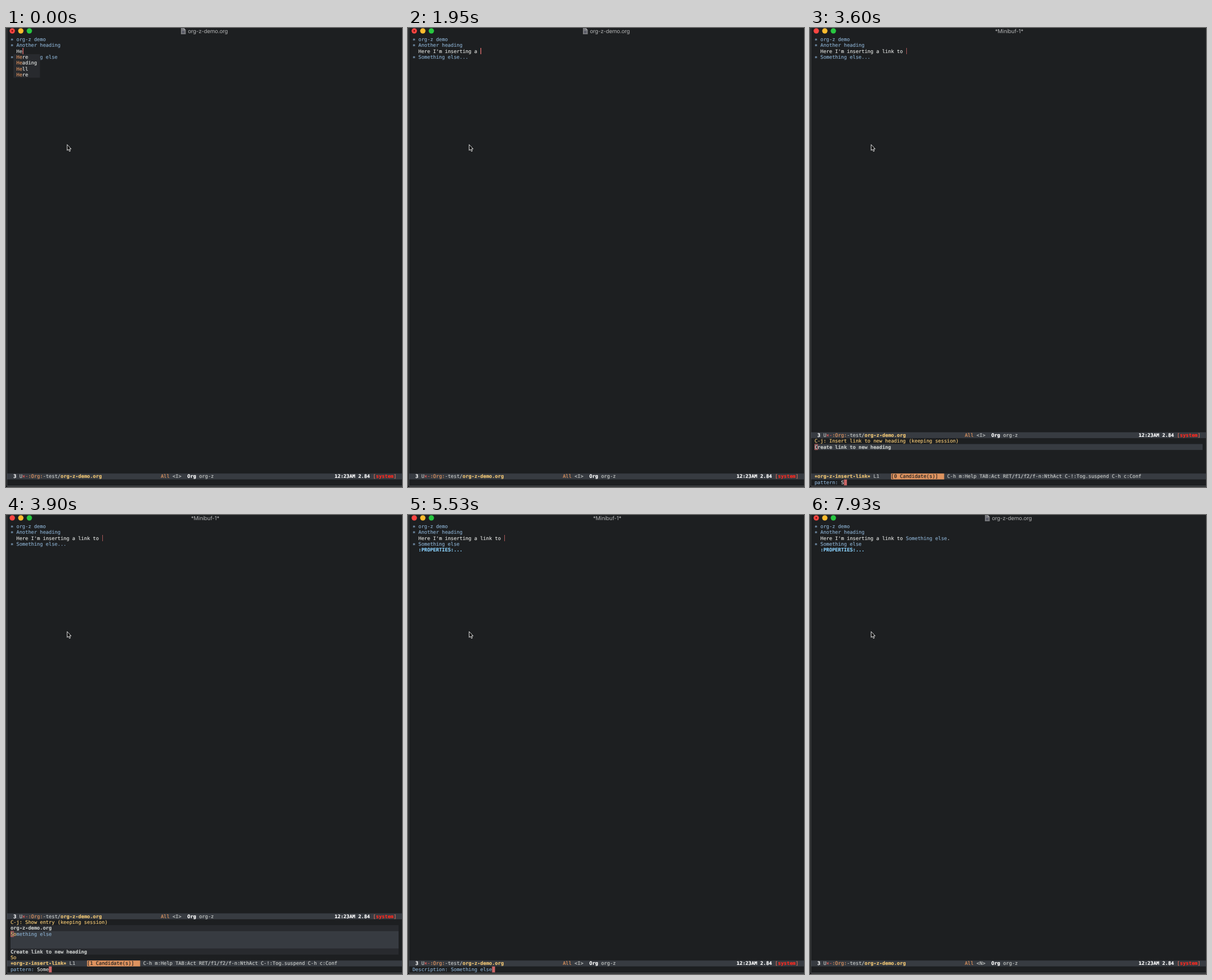
Animation, 695 px wide and 806 px high, one loop 8000 ms. Source, as an HTML page:

```html
<!DOCTYPE html>
<html lang="en">
<head>
<meta charset="utf-8">
<title>Inserting a link</title>
<style>
  html, body { margin: 0; width: 100%; height: 100%; overflow: hidden; background: #1d1f21; }
  svg { display: block; width: 695px; height: 806px; }
  text { font: 8.59px "DejaVu Sans Mono", monospace; white-space: pre; text-rendering: geometricPrecision; stroke-width: .18px; }
  .b { font-weight: bold; }
  .title { font: 9.6px Inter, sans-serif; letter-spacing: -0.2px; }
</style>
</head>
<body>
<svg id="stage" viewBox="0 0 695 806"></svg>
<script>
const LOOP = 8000, CHAR = 5.172, ROW = 10.35, LEFT = 7.9;
const BODY = 14.9, MODE = 782.3, MINI = 792.8;
const BG = '#1d1f21', BAR = '#373b41', SHADE = '#282a2e', FG = '#c5c8c6', LIGHT = '#dcdedc',
      BLUE = '#86a9c8', RED = '#cc6666', ORANGE = '#de935f', YELLOW = '#f0c674';

const IN = ['insert', 'inserting', 'insertion', 'inside-a-heading'];
const LI = ['link', 'links', 'link-type', 'list', 'line', 'lists', 'like', 'listing', 'limit', 'lisp'];

// [time, typed characters, popup prefix length, popup candidates]
const LINE = "Here I'm inserting a link to ";
const TYPING = [
  [0, 2, 2, ['Here', 'Heading', 'Hell', 'Here']], [150, 3, 3, ['Here', 'Here']],
  [300, 5], [450, 6], [600, 8], [750, 9], [900, 11, 2, IN], [1050, 12, 3, IN],
  [1200, 13, 4, IN.slice(0, 3)], [1500, 15, 6, IN.slice(0, 3)],
  [1650, 17, 8, ['inserting']], [1800, 19], [1950, 21], [2100, 22],
  [2250, 23, 2, LI], [2400, 24, 3, LI.slice(0, 3)], [2550, 25, 4, LI.slice(0, 3)],
  [2700, 27], [2850, 29]
];
// [time, typed pattern length, matched pattern length]
// typed -1 hides the prompt, matched -1 means no candidates
const PATTERN = 'Something el';
const SEARCH = [
  [3150, 0, 0], [3600, 1, -1], [3750, 3, 2], [3900, 4, 2], [4050, 5, 4],
  [4200, 7, 5], [4350, 8, 7], [4500, 10, 8], [4640, 12, 10], [4940, -1, 12]
];

const at = (steps, t) => steps.filter(s => s[0] <= t).pop();
const colX = col => LEFT + col * CHAR;
// the asterisk operator sits at mid-height, like the terminal star
const esc = s => s.replace(/&/g, '&amp;').replace(/</g, '&lt;').replace(/\*/g, '∗');
const rect = (x, y, w, h, fill) =>
  `<rect x="${x}" y="${y}" width="${w}" height="${h}" fill="${fill}"/>`;
const put = (col, top, s, fill, bold) =>
  `<text x="${colX(col)}" y="${top + 8.1}" fill="${fill}" stroke="${fill}"${bold ? ' class="b"' : ''}>${esc(s)}</text>`;
const bar = (col, width = 1.5) => rect(Math.ceil(colX(col)), 35, width, 11, RED);
const block = (col, top) => rect(colX(col), top, CHAR, ROW, RED);
const row = n => BODY + n * ROW;

function chrome(mini) {
  const lights = ['#fc4642', '#fdbc2e', '#28c840'].map((c, i) =>
    `<circle cx="${11 + i * 15}" cy="5.1" r="4.7" fill="${c}"/>`).join('');
  const title = mini
    ? '<text class="title" x="349.5" y="9" text-anchor="middle" fill="#b2b3b4">*Minibuf-1*</text>'
    : '<circle cx="11" cy="5.1" r="1.5" fill="#7a0a08"/>' +
      '<path d="M307 0h5l3.500 3.500v7.500h-8.500z" fill="#77787c"/><path d="M312 0v3.500h3.500z" fill="#a5a6aa"/>' +
      rect(309, 5, 4, 4, '#595a66') +
      '<text class="title" x="319.300" y="9" fill="#b2b3b4">org-z-demo.org</text>';
  return rect(0, 0, 695, 806, BG) + rect(0, 0, 1, 806, '#151617') + rect(1, 0, 1, 804, '#4b4d4f') +
    rect(2, 804, 693, 1, '#626467') + rect(0, 805, 695, 1, '#151617') + lights + title;
}

function modeLine(top, state) {
  return rect(2, top, 693, ROW, BAR) +
    put(1, top, '3', '#fff', 1) + put(3, top, 'U', FG) + put(4, top, '×-', '#e0605c') +
    put(6, top, ':Org:', ORANGE) + put(11, top, '-test/', FG) +
    put(17, top, 'org-z-demo.org', YELLOW, 1) + put(51, top, 'All', ORANGE) +
    put(55, top, `<${state}>`, FG) + put(60, top, 'Org', '#fff', 1) + put(64, top, 'org-z', FG) +
    put(110, top, '12:23AM 2.84', '#fff', 1) + put(123, top, '[', '#e07060') +
    put(124, top, 'system', '#ff2a20', 1) + put(130, top, ']', '#e07060');
}

function popup(col, prefix, items) {
  const width = (Math.max(...items.map(s => s.length)) + 2) * CHAR;
  return rect(colX(col - 1), row(3), width, items.length * ROW, SHADE) +
    items.map((s, i) => put(col, row(3 + i), s.slice(0, prefix), ORANGE) +
      put(col + prefix, row(3 + i), s.slice(prefix), LIGHT)).join('');
}

function helm([, typed, matched]) {
  const empty = matched === 0, none = matched < 0;
  const items = none ? [] : empty ? ['org-z demo', 'Another heading', 'Something else'] : ['Something else'];
  const lines = none ? 6 : 4 + items.length * 3;
  const top = MODE - (lines + 1) * ROW, y = n => top + n * ROW;
  const fill = (n, rows, color) => rect(8, y(n), 681, rows * ROW, color);
  const create = 'Create link to new heading';
  let out = modeLine(top, 'I') +
    put(0, y(1), `C-j: ${none ? 'Insert link to new heading' : 'Show entry'} (keeping session)`, YELLOW);
  if (none) {
    out += fill(2, 1, BAR) + put(0, y(2), create, FG, 1);
  } else {
    const end = 3 + items.length * 3;
    out += fill(2, 1, SHADE) + put(0, y(2), 'org-z-demo.org', FG, 1) + fill(3, 3, BAR) +
      items.map((s, i) => put(0, y(3 + i * 3), s.slice(0, matched), YELLOW) +
        put(matched, y(3 + i * 3), s.slice(matched), BLUE)).join('') +
      fill(end, 1, SHADE) + put(0, y(end), create, FG, 1) +
      put(0, y(end + 1), PATTERN.slice(0, matched), YELLOW);
  }
  out += `<rect x="8.500" y="${y(none ? 2 : 3) + .5}" width="4.600" height="9.400" fill="none" stroke="${RED}"/>`;
  out += rect(2, MODE, 693, ROW, BAR) + put(0, MODE, '*org-z-insert-link*', YELLOW, 1) +
    put(20, MODE, 'L1', FG) + rect(colX(26), MODE, 18 * CHAR, ROW, ORANGE) +
    put(26, MODE, `[${items.length} Candidate(s)]`, BG) +
    put(45, MODE, 'C-h m:Help TAB:Act RET/f1/f2/f-n:NthAct C-!:Tog.suspend C-h c:Conf', FG);
  if (typed >= 0) {
    out += put(0, MINI, 'pattern:', BLUE) + put(9, MINI, PATTERN.slice(0, typed), LIGHT) + block(9 + typed, MINI);
  }
  return out;
}

function draw(t) {
  const [, count, prefix, items] = at(TYPING, t);
  const mini = t >= 3150 && t < 6430, searching = t >= 3150 && t < 5090, linked = t >= 6430;
  const opened = t >= 5090, normal = t >= 7480;
  let out = chrome(mini) +
    put(0, row(0), '* org-z demo', BLUE) + put(0, row(1), '* Another heading', BLUE) +
    put(2, row(2), LINE.slice(0, count), LIGHT) +
    put(0, row(3), '* Something else' + (items || opened ? '' : '...'), BLUE);
  if (opened) out += put(2, row(4), ':PROPERTIES:...', '#87cefa', 1);
  if (linked) {
    out += put(31, row(2), 'Something else', BLUE);
    if (normal && t < 7930) out += block(45, row(2));
    if (t >= 7330) out += put(45, row(2), '.', normal && t < 7930 ? BG : LIGHT);
    if (t < 6880) out += bar(45);
    else if (t >= 7330 && !normal) out += bar(46);
  } else {
    out += bar(2 + count, mini ? .8 : undefined);
  }
  if (items) out += popup(2 + count - prefix, prefix, items);
  out += searching ? helm(at(SEARCH, t)) : modeLine(MODE, normal ? 'N' : 'I');
  if (t >= 5530 && !linked) {
    out += put(0, MINI, 'Description:', BLUE) + put(13, MINI, 'Something else', BLUE);
    if (t < 6130) out += block(27, MINI);
  }
  return out + '<path d="M107.300 204.700v10.300l2.300-2.100 1.700 3.800 1.700-.8-1.700-3.600h3z" fill="#000" stroke="#fff" stroke-width=".9"/>';
}

const stage = document.getElementById('stage');
const start = performance.now();
let shown = '';
function frame(now) {
  const next = draw(Math.max(0, now - start) % LOOP);
  if (next !== shown) stage.innerHTML = shown = next;
  requestAnimationFrame(frame);
}
frame(start);
</script>
</body>
</html>
```
